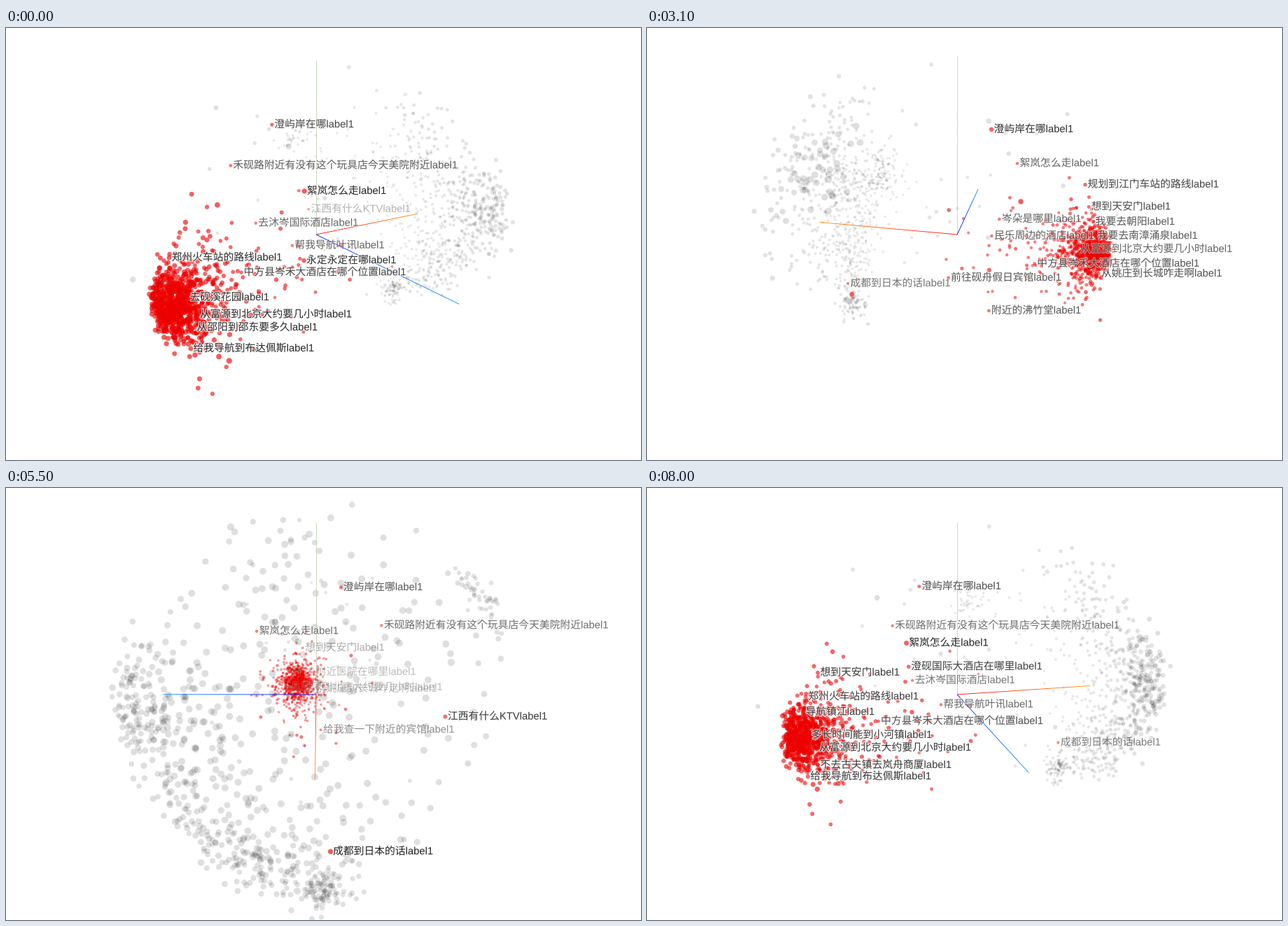
A matplotlib script that plays this animation: 907x617 px, repeating every 9.6 s.

```python
import numpy as np
import matplotlib.pyplot as plt
import matplotlib.patheffects as pe
from matplotlib.animation import FuncAnimation
from matplotlib.collections import LineCollection

W, H, DPI = 907, 617, 100
PX = 72 / DPI
FRAMES, INTERVAL = 96, 100
CENTER = np.array([443, 295])
FOCAL, DIST = 421.3, 1.92

# First and last frame of every burst of rotation
BURSTS = [(6, 15), (18, 27), (28, 31), (35, 42), (46, 55),
          (57, 63), (65, 69), (72, 75), (78, 80)]

# Key views: rotation steps taken, azimuth, sine of elevation
VIEWS = np.array([(0, -33, .316), (9, -94.6, .385), (24, -168.5, .44),
                  (36, -232, .26), (47, -301.3, .285), (54, -336.2, .275),
                  (61, -373.8, .268)])
STEPS, AZIMUTH, SIN_ELEV = VIEWS.T

# Text, the key views that show it, its dot in the first one or two of them
LABELS = [
    ("澄屿岸在哪", "0412356", (380, 139), (450, 141)),
    ("絮岚怎么走", "0412356", (427, 235), (320, 207)),
    ("禾砚路附近有没有这个玩具店今天美院附近", "04356", (321, 198), (482, 192)),
    ("江西有什么KTV", "04135", (432, 258), (610, 297)),
    ("成都到日本的话", "46235", (589, 482), (588, 365)),
    ("去沐岑国际酒店", "016", (357, 279), (344, 318)),
    ("中方县岑禾大酒店在哪个位置", "12036", (449, 386), (554, 338)),
    ("想到天安门", "2356", (631, 255), (508, 232)),
    ("规划到江门车站的路线", "12", (497, 277), (626, 224)),
    ("给我查一下附近的宾馆", "45", (411, 348), (375, 360)),
    ("找一下沿线的卖土豆的", "45", (404, 375), (390, 388)),
    ("帮我导航叶讯", "06", (408, 311), (421, 309)),
    ("从富源到北京大约要几小时", "0123456", (273, 410), (553, 447)),
    ("郑州火车站的路线", "056", (233, 328)),
    ("给我导航到布达佩斯", "06", (264, 458)),
    ("永定永定在哪", "0", (426, 332)),
    ("去砚溪花园", "0", (259, 385)),
    ("从邵阳到邵东要多久", "0", (269, 428)),
    ("从姚庄到长城咋走啊", "1245", (480, 489)),
    ("天河梁景区在哪", "15", (493, 424)),
    ("砚禾高速的终点和起点在是在哪里", "1", (475, 295)),
    ("郑州游乐乐在哪里", "1", (492, 331)),
    ("从这里到禾岚大酒店怎么去", "1", (433, 350)),
    ("郑州到郑州市导航", "1", (449, 368)),
    ("我在什么位置", "1", (531, 404)),
    ("退出导航", "1", (432, 462)),
    ("帮我导航到禾岑人民政府", "1", (555, 466)),
    ("给我导航到砚木禾家居", "1", (539, 517)),
    ("岑朵是哪里", "2", (503, 273)),
    ("我要去朝阳", "2", (637, 277)),
    ("民乐周边的酒店", "2", (492, 297)),
    ("我要去南漳涌泉", "2", (640, 297)),
    ("前往砚舟假日宾馆", "2", (430, 357)),
    ("附近的沸竹堂", "2", (488, 404)),
    ("导航到潘火", "3", (488, 332)),
    ("路线规划到深圳大学出行方式是步行", "4", (384, 244)),
    ("附近医院在哪里", "4", (369, 266)),
    ("去岑竹溪大酒店", "5", (462, 233)),
    ("导航镇江", "63", (223, 320)),
    ("澄砚国际大酒店在哪里", "6", (374, 255)),
    ("多长时间能到小河镇", "6", (231, 353)),
    ("不去古夫镇去岚舟商厦", "6", (244, 396)),
]
RED_HEART = np.array([-.86, -.13, .17])


def step_at(i):
    return sum(min(max(i - a + 1, 0), b - a + 1) for a, b in BURSTS)


def camera(step):
    """Right, up and towards-the-eye unit vectors."""
    az = np.radians(np.interp(step, STEPS, AZIMUTH))
    se = np.interp(step, STEPS, SIN_ELEV)
    ce = np.sqrt(1 - se * se)
    s, c = np.sin(az), np.cos(az)
    return np.array([[c, 0, -s], [-se * s, ce, -se * c], [ce * s, se, ce * c]])


def project(points, step):
    r, u, n = camera(step) @ np.asarray(points).T
    depth = DIST - n
    return CENTER + FOCAL * np.column_stack([r, -u]) / depth[:, None], depth


def locate(steps, dots, weight=20):
    """Point in space seen at these dots, drawn weakly to the red cluster."""
    rows, rhs = list(weight * np.eye(3)), list(weight * RED_HEART)
    for step, (x, y) in zip(steps, dots):
        r, u, n = camera(step)
        for axis, d in ((r, x - CENTER[0]), (u, CENTER[1] - y)):
            rows.append(FOCAL * axis + d * n)
            rhs.append(d * DIST)
    return np.linalg.lstsq(np.array(rows), np.array(rhs), rcond=None)[0]


def make_gray(rng):
    """A patch of a sphere, thicker round three of its corners."""
    corners = np.array([[.82, .2, .68], [.9, -.72, -.05], [.3, .65, -.86],
                        [.55, .9, .1], [.95, -.7, .3]])
    mix = rng.dirichlet([1.1, .7, .45, .5, .7], 560) @ corners
    parts = [mix + rng.normal(0, .09, mix.shape)]
    for corner, spread, count in zip(corners, (.12, .07, .08), (120, 90, 35)):
        parts.append(rng.normal(corner, spread, (count, 3)))
    shell = np.vstack(parts)
    radius = rng.normal(1.06, .035, (len(shell), 1))
    shell *= radius / np.linalg.norm(shell, axis=1, keepdims=True)
    inner = rng.normal([.1, .1, 0], .33, (30, 3))
    return np.vstack([shell, inner])


def make_red(rng, core=800, tail=120):
    """A dense bulb on the far side with a loose tail towards the origin."""
    spread = rng.choice([.06, .105], (core, 1))
    side = rng.normal(0, spread, (core, 2))
    x = -.99 + rng.gamma(2, .05, core) + (side ** 2).sum(1)
    bulb = np.column_stack([x, RED_HEART[1:] + side])
    x = np.minimum(-.9 + rng.exponential(.26, tail), .1)
    loose = np.column_stack([x, rng.normal(RED_HEART[1:], .16, (tail, 2))])
    return np.vstack([bulb, loose])


class Label:
    def __init__(self, ax, index, text, views, *dots):
        self.views = [int(v) for v in views]
        self.shift = index * 3 % 5 - 2
        self.pos = locate(STEPS[self.views], dots)
        self.art = ax.text(0, 0, text + "label1", fontsize=14.8 * PX,
                           family=["Liberation Sans", "Noto Sans CJK JP"],
                           color="black", va="baseline",
                           path_effects=[pe.withStroke(linewidth=2.4 * PX,
                                                       foreground="white")])

    def update(self, xy, depth, step):
        nearest = np.argmin(abs(STEPS - step - self.shift))
        self.art.set_visible(nearest in self.views)
        self.art.set_position(xy + (3.5, 4))
        self.art.set_alpha(float(np.clip(1.4 - .46 * depth, .15, .95)))
        self.art.set_zorder(10 - depth)


fig = plt.figure(figsize=(W / DPI, H / DPI), dpi=DPI, facecolor="white")
ax = fig.add_axes([0, 0, 1, 1])
ax.set(xlim=(0, W), ylim=(H, 0))
ax.axis("off")

rng = np.random.default_rng(7)
labels = [Label(ax, i, *row) for i, row in enumerate(LABELS)]
gray = make_gray(rng)
cloud = np.vstack([gray, make_red(rng), [label.pos for label in labels]])
is_red = np.arange(len(cloud)) >= len(gray)
dots = ax.scatter(*cloud[:, :2].T, s=1, linewidths=0, zorder=1)

# Axes of unit length, each shading from its first colour to its second
CUTS = np.linspace(0, 1, 13)
SHADES = [((1, 0, 0), (1, .6, 0)), ((.76, .8, .7), (.76, .84, .64)),
          ((0, 0, 1), (0, .6, 1))]
shades = [np.array(a) * (1 - t) + np.array(b) * t
          for a, b in SHADES for t in CUTS[:-1]]
lines = LineCollection([], colors=shades, linewidths=.85 * PX, zorder=2)
ax.add_collection(lines)


def draw(i):
    step = step_at(i)
    xy, depth = project(cloud, step)
    for label, spot, d in zip(labels, xy[-len(labels):], depth[-len(labels):]):
        label.update(spot, d, step)

    rgba = np.zeros((len(cloud), 4))
    rgba[is_red, 0] = .93
    rgba[:, 3] = np.where(is_red, .82 - .15 * depth, .15 - .025 * depth)
    rgba[:, 3] = np.clip(rgba[:, 3], .06, .7)
    order = np.argsort(-depth)
    size = np.minimum(9.4 / depth[order], 10)
    dots.set_offsets(xy[order])
    dots.set_sizes((size * PX) ** 2)
    dots.set_facecolors(rgba[order])

    paths = [project(CUTS[:, None] * axis, step)[0] for axis in np.eye(3)]
    lines.set_segments([p[k:k + 2] for p in paths for k in range(len(CUTS) - 1)])
    return [dots, lines]


anim = FuncAnimation(fig, draw, frames=FRAMES, interval=INTERVAL,
                     init_func=lambda: draw(0), repeat=True, repeat_delay=0)
plt.show()
```
